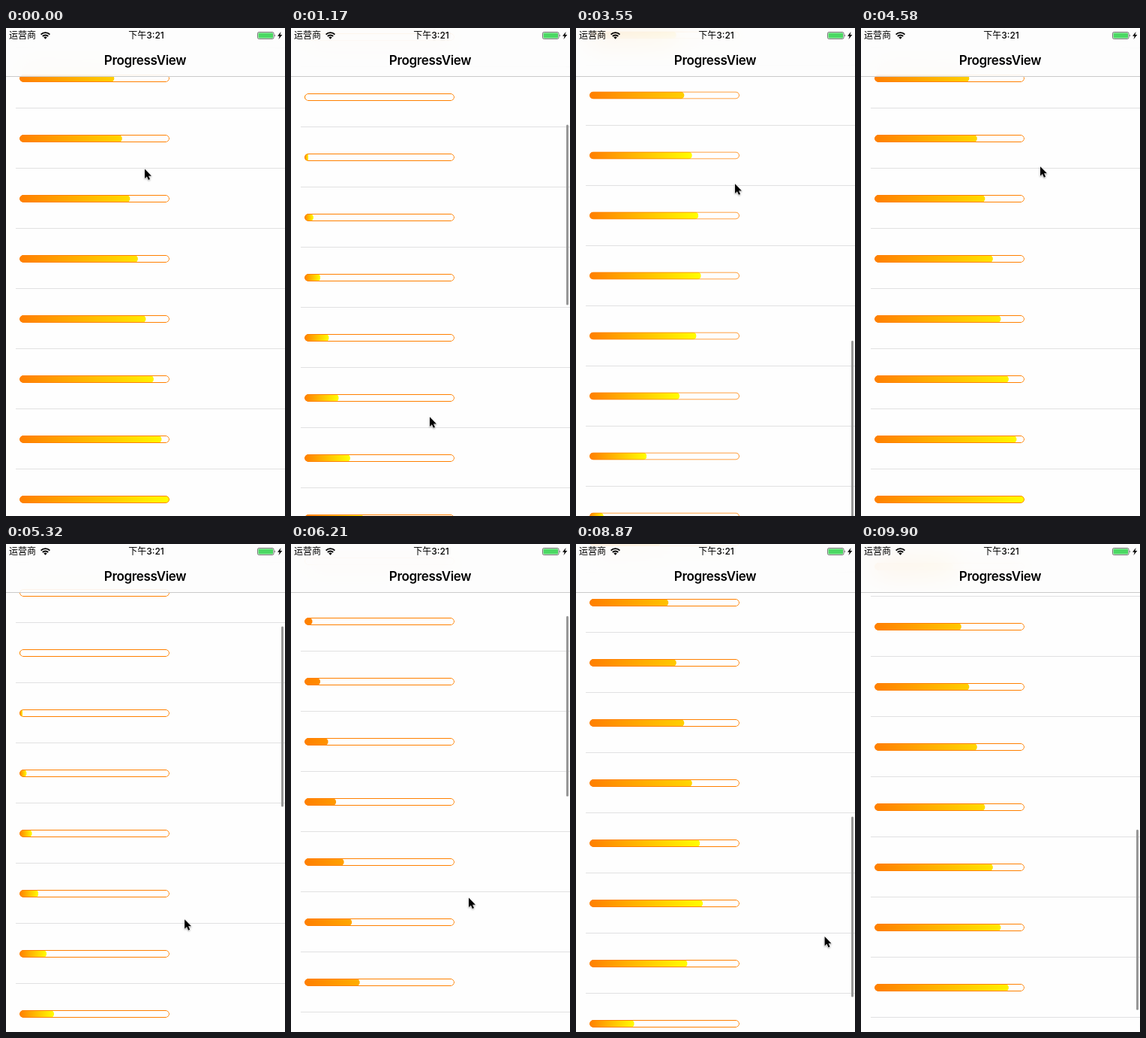
These frames come from a looping animation (372 px wide and 649 px high, 10 s). An HTML page:

```html
<!DOCTYPE html>
<html lang="zh">
<head>
<meta charset="utf-8">
<title>ProgressView</title>
<style>
  html, body { margin: 0; width: 100%; height: 100%; overflow: hidden; background: #fefefe; }
  #stage { position: relative; width: 372px; height: 649px; overflow: hidden; background: #fefefe; }
  #table, #nav, #thumb, #cursor { position: absolute; left: 0; top: 0; }
  #table { width: 372px; height: 1600px; }
  .row { position: absolute; left: 0; width: 372px; height: 80px; }
  .row::after {
    content: ""; position: absolute; left: 13px; right: 0; bottom: 0; height: 1px;
    background: #e1e1e2; transform: translateY(var(--snap));
  }
  .track { position: absolute; left: 18px; top: 35px; width: 200px; height: 10px; border-radius: 5px; overflow: hidden; }
  .track::after { content: ""; position: absolute; inset: 0; border: 1px solid #ff8000; border-radius: 5px; }
  .fill { height: 10px; background: linear-gradient(90deg, #ff7f00, #ff0) no-repeat; }
  #nav {
    width: 372px; height: 64px; border-bottom: 1px solid #cbcbcb;
    background: rgba(253, 253, 253, .82);
    -webkit-backdrop-filter: blur(17px); backdrop-filter: blur(17px);
    font-family: Inter, "Noto Sans CJK SC", "Noto Sans CJK", sans-serif; color: #000;
  }
  #nav span { position: absolute; white-space: nowrap; }
  .carrier { left: 4px; top: 1px; font-size: 12px; line-height: 18px; }
  .clock { left: 87px; width: 200px; top: 1px; text-align: center; font-size: 12px; line-height: 18px; font-weight: 500; }
  .title { left: 85px; width: 201px; top: 32px; text-align: center; font-size: 17px; line-height: 22px; font-weight: 600; letter-spacing: -.34px; }
  #nav svg { position: absolute; left: 0; top: 0; }
  #thumb { left: 367px; width: 3px; height: 240px; border-radius: 2px; background: #979797; }
  #cursor { overflow: visible; filter: drop-shadow(0 1px 1px rgba(0, 0, 0, .35)); }
</style>
</head>
<body>
<div id="stage">
  <div id="table"></div>
  <div id="thumb"></div>
  <div id="nav">
    <span class="carrier">运营商</span>
    <span class="clock">下午3:21</span>
    <span class="title">ProgressView</span>
    <svg width="372" height="64" fill="none">
      <path d="M46.6 8.6a8.2 8.2 0 0 1 11.8 0M48.8 11a5.2 5.2 0 0 1 7.4 0" stroke="#000" stroke-width="1.9"/>
      <path d="M52.5 14.8l-2.2-2.3a3.1 3.1 0 0 1 4.4 0z" fill="#000"/>
      <rect x="335.5" y="5.5" width="21.5" height="9" rx="1.8" stroke="#555" stroke-width=".8"/>
      <rect x="336.5" y="6.5" width="19.5" height="7" rx=".8" fill="#4cd964"/>
      <path d="M358 8.2q1.6 1.8 0 3.6z" fill="#333"/>
      <path d="M366.6 5l-4.6 5.7h2.7l-1.3 4.3 4.9-5.9h-2.8z" fill="#000"/>
    </svg>
  </div>
  <svg id="cursor" width="14" height="20">
    <path d="M1 .5v12.6l2.9-2.7 2 4.6 2.1-.9-2-4.4h3.9z" fill="#000" stroke="#fff" stroke-linejoin="round" paint-order="stroke"/>
  </svg>
</div>
<script>
const LOOP = 10, STEP = 0.1478;
const ROWS = 20, ROW_H = 80, TOP = 64, VIEW_H = 667, TRACK = 200;
const MAX_SCROLL = ROWS * ROW_H + TOP - VIEW_H;
const GLIDE_RATE = 1.92, FILL_DELAY = 0.04, FILL_TIME = 0.95;

// Drags: pointer path from press to release (times in steps), then the distance glided.
const drags = [
  { press: 1, release: 3, from: [184, 187], to: [184, 469], glide: -800 },
  { press: 14, release: 17, from: [184, 600.5], to: [184, 230], glide: 700 },
  { press: 31.5, release: 32.5, from: [240, 182], to: [238, 462], glide: -950 },
  { press: 41, release: 43, from: [236, 551], to: [236, 351.5], glide: 0 },
  { press: 45, release: 48, from: [240, 360], to: [270, 560], glide: 0 },
  { press: 50, release: 51, from: [276, 550.5], to: [276, 381], glide: 712 }
];
const EXIT = [377, 641];

const clamp = (x, lo, hi) => Math.min(hi, Math.max(lo, x));
const mix = (a, b, u) => a.map((v, i) => v + (b[i] - v) * u);
const lastDrag = t => drags.filter(d => d.press <= t).pop();

function pointer(t) {
  const i = drags.indexOf(lastDrag(t)), d = drags[i], next = drags[i + 1];
  if (!d) return drags[0].from;
  if (t <= d.release) return mix(d.from, d.to, ((t - d.press) / (d.release - d.press)) ** 1.3);
  const end = next ? next.press : LOOP / STEP;
  return mix(d.to, next ? next.from : EXIT, (t - d.release) / (end - d.release));
}

function dragScroll(d, t) {
  const held = d.start + d.from[1] - pointer(Math.min(t, d.release))[1];
  const glided = d.glide * (1 - Math.exp(-GLIDE_RATE * STEP * Math.max(0, t - d.release)));
  return clamp(held + glided, 0, MAX_SCROLL);
}

function scrollAt(t) {
  const d = lastDrag(t);
  return d ? dragScroll(d, t) : MAX_SCROLL;
}

drags.forEach((d, i) => {
  d.start = i ? dragScroll(drags[i - 1], d.press) : MAX_SCROLL;
  const held = dragScroll(d, d.release);
  const share = d.glide && (clamp(held + d.glide, 0, MAX_SCROLL) - held) / d.glide;
  d.rest = d.release - Math.log(1 - share * .999) / GLIDE_RATE / STEP;
});

// The indicator stays a moment after the list rests, then fades.
function thumbOpacity(t) {
  const d = lastDrag(t);
  return d ? clamp(1 - ((t - d.rest) * STEP - .3) / .25, 0, 1) : 0;
}

// cubic-bezier(.42, 0, .58, 1)
function easeInOut(x) {
  let lo = 0, hi = 1, s = 0;
  if (x <= 0 || x >= 1) return clamp(x, 0, 1);
  for (let n = 0; n < 20; n++) {
    s = (lo + hi) / 2;
    const at = 1.26 * s * (1 - s) ** 2 + 1.74 * s * s * (1 - s) + s ** 3;
    if (at < x) lo = s; else hi = s;
  }
  return s * s * (3 - 2 * s);
}

const el = id => document.getElementById(id);
const table = el("table"), thumb = el("thumb"), cursor = el("cursor");

const rows = Array.from({ length: ROWS }, (_, i) => {
  const row = document.createElement("div");
  row.className = "row";
  row.style.top = i * ROW_H + "px";
  row.innerHTML = '<div class="track"><div class="fill"></div></div>';
  table.append(row);
  return { fill: row.querySelector(".fill"), width: TRACK * i / (ROWS - 1), entries: [-LOOP / STEP] };
});

// A bar refills each time its row comes back into view.
function findEntries() {
  const inView = (i, s) => {
    const y = TOP + i * ROW_H - s;
    return y + ROW_H > 0 && y < VIEW_H;
  };
  let before = scrollAt(0);
  for (let t = 0; t * STEP < LOOP; t += .03) {
    const now = scrollAt(t);
    rows.forEach((row, i) => {
      if (inView(i, now) && !inView(i, before)) row.entries.push(t);
    });
    before = now;
  }
}

function draw(t) {
  const s = Math.round(scrollAt(t) * 2) / 2;
  table.style.transform = `translateY(${TOP - s}px)`;
  table.style.setProperty("--snap", s % 1 + "px");
  for (const { fill, width, entries } of rows) {
    const entered = entries.filter(x => x <= t).pop();
    const p = easeInOut(((t - entered) * STEP - FILL_DELAY) / FILL_TIME);
    const w = width * p;
    fill.style.clipPath = `inset(0 ${TRACK - w}px 0 0 round 5px)`;
    fill.style.backgroundSize = (p < 1 ? w : TRACK) + "px 100%";
  }
  thumb.style.transform = `translateY(${66.8 + .358 * s}px)`;
  thumb.style.opacity = thumbOpacity(t);
  const [x, y] = pointer(t);
  cursor.style.transform = `translate(${x}px, ${y}px)`;
}

findEntries();
const origin = performance.now();
function tick() {
  const t = Math.max(0, performance.now() - origin) / 1000 % LOOP;
  draw(Math.floor((t + .008) / STEP));
  requestAnimationFrame(tick);
}
tick();
</script>
</body>
</html>
```
